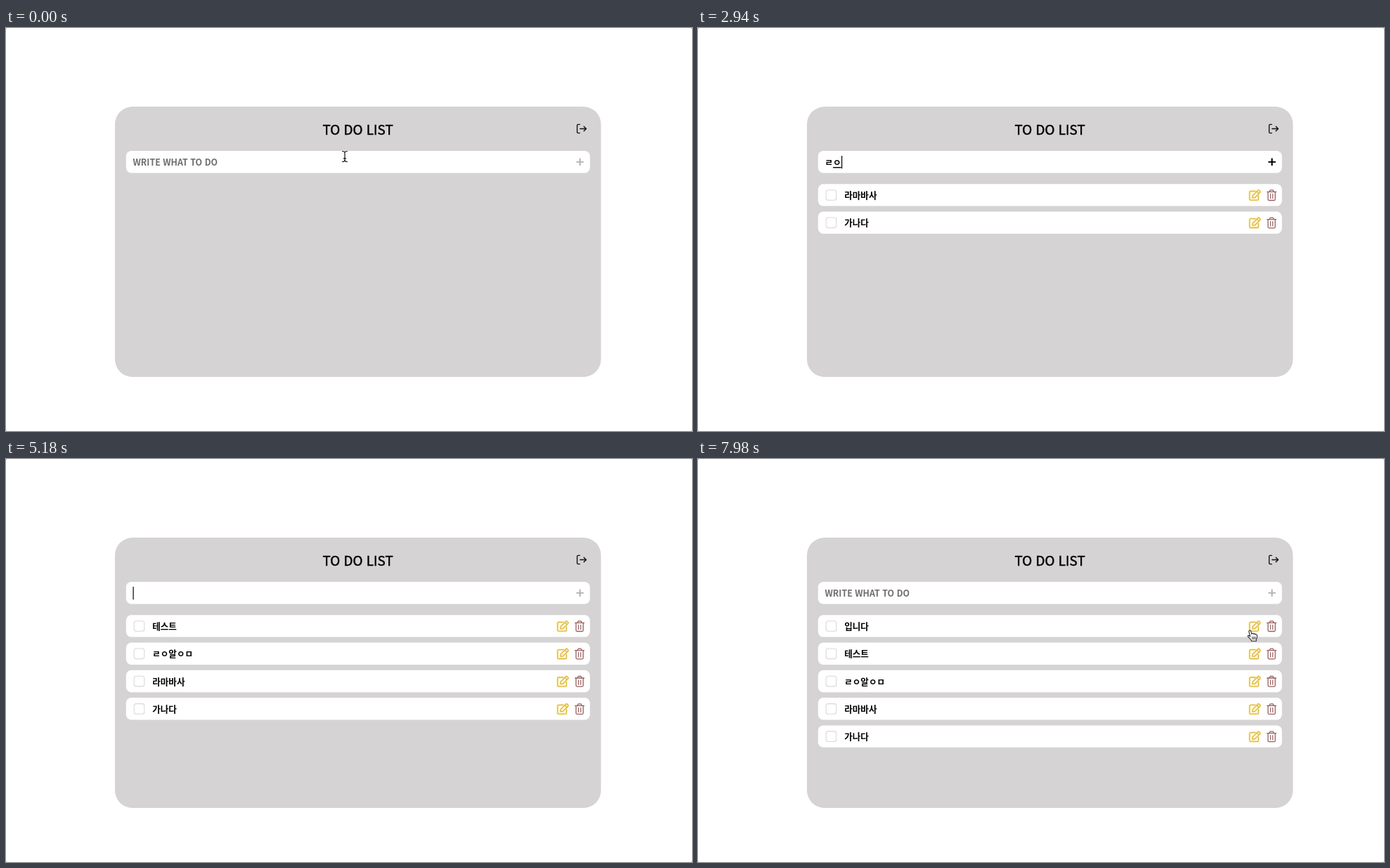
Recreate the animation shown at these times as an HTML page. Size 976 by 574 pixels, loop 8 s.

```html
<!DOCTYPE html>
<html lang="ko">
<head>
<meta charset="utf-8">
<title>To do list</title>
<style>
  html, body { margin: 0; width: 100%; height: 100%; overflow: hidden; background: #777; }
  svg { display: block; width: 976px; height: 574px; }
  text { font: 700 12.58px "Noto Sans CJK KR", "Noto Sans CJK", "Noto Sans", sans-serif; white-space: pre; }
  .title { font-size: 18.87px; font-weight: 500; text-anchor: middle; stroke: #000; stroke-width: .45; }
  #placeholder { font-size: 12.42px; fill: #6e6e6e; }
  .line { fill: none; stroke-linecap: round; stroke-linejoin: round; }
</style>
</head>
<body>
<svg viewBox="0 0 976 574">
  <defs>
    <path id="pencil" d="M788.8 19.6l.4-3.1 7.3-7.3q1-1 2 0l1 1q1 1 0 2l-7.4 7.3zM795.2 10.6l3 3"/>
    <path id="sheet" d="M793 10.2h-6.6q-1.6 0-1.6 1.6v9.6q0 1.6 1.6 1.6h9.4q1.6 0 1.6-1.6v-4.6"/>
    <g id="row">
      <rect x="170.8" width="660" height="31.4" rx="7.5" fill="#fff"/>
      <rect x="182.2" y="8.5" width="14.6" height="14.6" rx="3" fill="#fff" stroke="#d9d9d9" stroke-width="1.1"/>
      <g class="line" stroke="#fff5bd" stroke-width="3.2"><use href="#sheet"/><use href="#pencil"/></g>
      <g class="line" stroke="#dcb44a" stroke-width="1.3"><use href="#sheet"/><use href="#pencil"/></g>
      <g class="line" stroke="#965f5f" stroke-width="1.3">
        <path d="M809.7 11.2h12.8M812.9 11l1.3-2.3h3.8l1.3 2.3M811 11.4v10.4q0 1.5 1.5 1.5h7.2q1.5 0 1.5-1.5v-10.4"/>
        <path d="M814.5 14.2v6.2M817.7 14.2v6.2" stroke-width="1.2"/>
      </g>
    </g>
    <path id="beam" class="line" d="M-3.5-7.5q3.5 0 3.5 2.2v10.6q0 2.2-3.5 2.2M3.5-7.5q-3.5 0-3.5 2.2M0 5.3q0 2.2 3.5 2.2M-1.6 2.8h3.2"/>
  </defs>

  <rect width="976" height="574" rx="1.5" fill="#fff"/>
  <rect x="155" y="112" width="691.5" height="385" rx="25" fill="#d5d3d4"/>
  <text class="title" x="500.6" y="152">TO DO LIST</text>
  <path class="line" stroke="#111" stroke-width="1.4"
    d="M816.3 137.4h-2.4q-1.3 0-1.3 1.3v9.6q0 1.3 1.3 1.3h2.4M816.8 143.5h8.6M822.2 140.2l3.3 3.3-3.3 3.3"/>

  <rect x="170.8" y="175" width="660" height="31.4" rx="7.5" fill="#fff"/>
  <text id="placeholder" x="180.5" y="196.3">WRITE WHAT TO DO</text>
  <text id="typed" x="180.5" y="196.3"></text>
  <rect id="underline" y="198" width="11.6" height="1.4"/>
  <rect id="caret" y="182" width="1.2" height="18.2"/>
  <path id="plus" d="M811.4 190.8h10.4M816.6 185.6v10.4" stroke-width="2.1"/>

  <g id="list"></g>

  <g id="ibeam">
    <use href="#beam" stroke="#fff" stroke-width="2.6"/>
    <use href="#beam" stroke="#111" stroke-width="1.2"/>
  </g>
  <path id="arrow" d="M0 0v13.2l3-2.8 2.1 5 2.3-1-2.1-4.8h4.2z" fill="#000" stroke="#fff" stroke-width="1" stroke-linejoin="round"/>
  <g id="hand" class="line" stroke="#222" stroke-width="1.1">
    <path fill="#fff" d="M-2.4 8.6L-4.2 1.6Q-4.3 0-2.9-.2-1.7-.2-1.3 1.2L-.1 5.2Q.2 4 1.4 4.1 2.5 4.2 2.7 5.2 3.2 4.4 4.2 4.7 5.1 5 5.2 5.8 7.2 5.3 7.5 7.2 7.7 10 6.4 12.2L6.2 15H-.4Q-1.2 13-3.2 11.2L-5.6 8.6Q-6 7.4-4.8 7-3.8 6.9-2.4 8.6z"/>
    <path d="M.5 9.3l.4 3.3M2.6 9.2l.1 3.4M4.7 9.1l-.1 3.4" stroke-width=".9"/>
  </g>
</svg>

<script>
const LOOP = 8000, TICK = 70, BLINK = 490, BLUR = 7210;
const GLYPH = 12.58 * 0.92;

// Each entry: the time and the input text from then on; an empty text submits the previous one.
const typing = [
  [350, 'ㄱ'], [420, '가'], [560, '간'], [630, '가나'], [770, '가낟'], [840, '가나다'], [980, ''],
  [1050, 'ㄹ'], [1120, '라'], [1260, '람'], [1330, '라마'], [1400, '라맙'],
  [1540, '라마바'], [1680, '라마밧'], [1820, '라마바사'], [1960, ''],
  [2940, 'ㄹㅇ'], [3220, 'ㄹㅇㅇ'], [3290, 'ㄹㅇ아'], [3430, 'ㄹㅇ알'],
  [3500, 'ㄹㅇ알ㅇ'], [3570, 'ㄹㅇ알ㅇㅁ'], [3710, ''],
  [4550, 'ㅌ'], [4620, '테'], [4760, '텟'], [4830, '테스'], [4970, '테슽'], [5040, '테스트'], [5180, ''],
  [5250, 'ㅇ'], [5320, '이'], [5460, '입'], [5530, '입ㄴ'],
  [5600, '입니'], [5740, '입닏'], [5880, '입니다'], [6020, '']
];

// Pointer path: time, x, y
const path = [
  [6580, 525, 197], [6650, 590, 217], [6720, 650, 233], [6790, 701, 243], [6860, 732, 247.5],
  [7000, 755, 250.5], [7210, 774, 250], [7490, 784, 247], [7630, 784, 247], [7700, 785, 246.5], [7980, 788, 244.2]
];

const $ = id => document.getElementById(id);
const show = (el, on) => el.setAttribute('visibility', on ? 'visible' : 'hidden');

const items = typing.flatMap(([time, text], i) => text ? [] : [{ time, text: typing[i - 1][1] }]);
for (const item of items) {
  $('list').insertAdjacentHTML('beforeend',
    `<g><use href="#row"/><text x="208.2" y="20.9">${item.text}</text></g>`);
  item.el = $('list').lastElementChild;
}

function pointerAt(t) {
  if (t < typing[0][0]) return ['ibeam', 482, 183];
  const next = path.findIndex(p => p[0] > t);
  if (next === 0) return [null, 0, 0];
  const b = next < 0 ? path.at(-1) : path[next];
  const a = next < 0 ? b : path[next - 1];
  const k = b === a ? 0 : (t - a[0]) / (b[0] - a[0]);
  const kind = t < 6650 ? 'ibeam' : t < 7700 ? 'arrow' : 'hand';
  return [kind, a[1] + (b[1] - a[1]) * k, a[2] + (b[2] - a[2]) * k];
}

function draw(time) {
  const t = Math.floor(time / TICK) * TICK;
  const [since, text] = typing.findLast(step => step[0] <= t) || [0, ''];
  const focused = since > 0 && t < BLUR;
  const end = 180.5 + text.length * GLYPH;

  $('typed').textContent = text;
  show($('placeholder'), !focused);
  show($('caret'), focused && Math.floor((t - since) / BLINK) % 2 === 0);
  $('caret').setAttribute('x', end + (text ? 0.4 : 0));
  show($('underline'), text);
  $('underline').setAttribute('x', end - GLYPH);
  $('plus').setAttribute('stroke', text ? '#000' : '#b5b5b5');

  const added = items.filter(item => item.time <= t).length;
  items.forEach((item, i) => {
    show(item.el, i < added);
    item.el.setAttribute('transform', `translate(0 ${222.2 + 39.3 * (added - 1 - i)})`);
  });

  const [kind, x, y] = pointerAt(t);
  for (const id of ['ibeam', 'arrow', 'hand']) {
    show($(id), id === kind);
    $(id).setAttribute('transform', `translate(${x} ${y})`);
  }
}

const start = performance.now();
function frame() {
  draw((performance.now() - start) % LOOP);
  requestAnimationFrame(frame);
}
frame();
</script>
</body>
</html>
```
